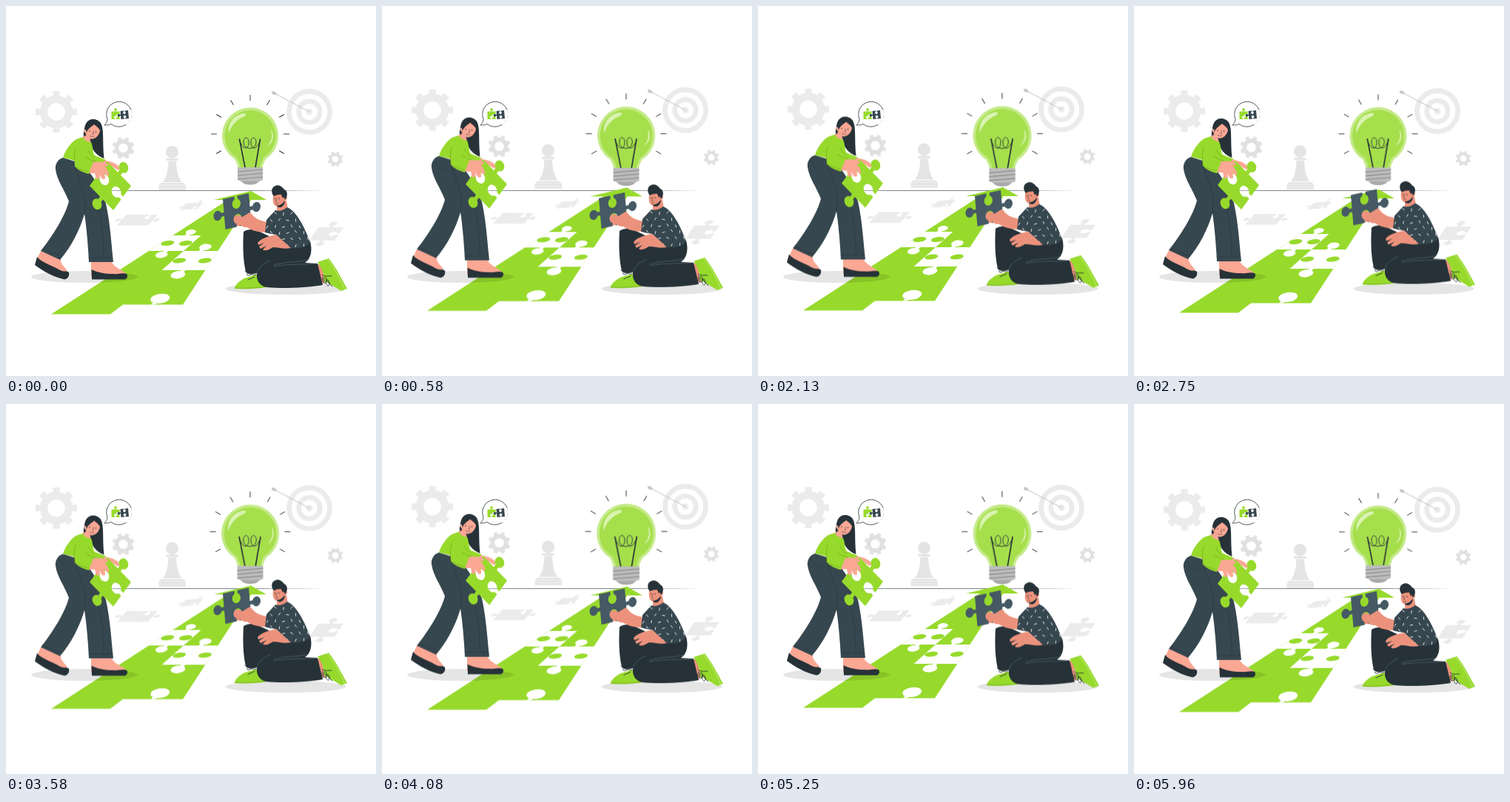
Write an HTML page that moves like this. It is 500 by 500 pixels and loops after 6000 ms.

```html
<!DOCTYPE html>
<html lang="en">
<head>
<meta charset="utf-8">
<title>Puzzle path</title>
<style>
  html, body { margin: 0; width: 100%; height: 100%; overflow: hidden; background: #fff; }
  svg { display: block; width: 100%; height: 100%; }
  .green { fill: #97da2c; }
  .dark { fill: #263238; }
  .slate { fill: #37474f; }
  .steel { fill: #455a64; }
  .pale { fill: #ebebeb; }
  .white { fill: #fff; }
  .skin { fill: #faa794; }
  .tan { fill: #ec927c; }
  .shade { fill: rgba(0, 0, 0, .1); }
  .ink, .fold, .fine, .seam { fill: none; stroke: #263238; stroke-linecap: round; stroke-linejoin: round; }
  .ink { stroke-width: .9; }
  .fold, .seam { stroke-width: .5; }
  .fine { stroke-width: .6; stroke: #6f9f1d; }
  .seam { stroke: #6b7a82; }
  .gear { fill: none; }
  #bulb { transform-origin: 330px 187px; }
</style>
</head>
<body>
<svg viewBox="0 0 500 500" xmlns="http://www.w3.org/2000/svg">
  <defs>
    <path id="shirt" d="M364 276C369 278 375 276 380 272C390 276 401 292 411 319C407 326 396 328 384 327L365 309L358 308L350 306L352 289Z"/>
    <clipPath id="shirtClip"><use href="#shirt"/></clipPath>
  </defs>

  <g id="back">
    <g id="gears"></g>
    <g id="board"></g>
    <path d="M361 117L410 143" stroke="#b5b5b5" stroke-width=".8"/>
    <path d="M358.500 116L362 115L366 118.500L365 120L360.500 119.500Z" fill="#c4c4c4"/>

    <g fill="#e4e4e4">
      <circle cx="224.500" cy="197.500" r="8.500"/>
      <rect x="216" y="206" width="17" height="3" rx="1.500"/>
      <path d="M219.500 209.500H230C230.500 221 232 231 237.500 238H212C217.500 231 219 221 219.500 209.500Z"/>
      <path d="M209 239H240.500L243 243V249H206.500V243Z"/>
      <path d="M206.500 242H243M206.500 246H243M217 209.200H232" stroke="#f7f7f7" stroke-width=".8"/>
    </g>
    <g id="tiles"></g>
  </g>

  <path d="M66 249.500L180 249L330 249L432 249.500L330 250L180 250Z" fill="#7d868a"/>
  <g id="arrow"></g>

  <ellipse class="shade" cx="106" cy="366" rx="72" ry="8"/>
  <ellipse class="shade" cx="378" cy="382" rx="81.500" ry="8"/>

  <g id="bulb">
    <g id="rays" class="ink"></g>
    <path d="M313.500 219C313 214 311 211 309 207A38 38 0 1 1 351 207C349 211 347 214 346.500 219Z" fill="#c4ea88"/>
    <path d="M317 219C316.500 213 314 209 312 205A34.500 34.500 0 1 1 348 205C346 209 344 213 343.500 219Z" fill="#a6df4c"/>
    <path d="M322 145C307 147 299 159 301 172C304 163 311 153 323 149C325 146 324 145 322 145Z" fill="#d9f3b0"/>
    <path d="M358 168C361 177 358 184 353 189C361 185 363 176 359 168Z" fill="#d9f3b0"/>
    <path class="ink" style="stroke-width:1.600" d="M315.500 180L323 218M343.500 180L337 218"/>
    <path class="ink" d="M315.500 181C319 194 328 196 328 184C328 176 321 176 321 184C321 195 338 195 338 184C338 176 331 176 331 184C331 196 340 194 343.500 181"/>
    <path d="M313 218H347V235L341 237.500H319L313 235Z" fill="#bcbcbc"/>
    <path d="M318 236.500H342C340 240.500 335 241.500 330 241.500C325 241.500 320 240.500 318 236.500Z" fill="#a9a9a9"/>
    <path d="M313 224L347 221M313 229L347 226M313 234L347 231" stroke="#8d8d8d" stroke-width="1.200"/>
  </g>

  <path class="ink" style="stroke-width:.8" d="M169 140A17 17 0 1 0 137 153C137 156 135 159 133 161C136 161 139 161 142 159.500A17 17 0 0 0 162 160.500"/>
  <path d="M169 140A17 17 0 0 1 162 160.500" fill="none" stroke="#b8bdc0" stroke-width=".5" stroke-dasharray="5 2"/>
  <g id="icons"></g>

  <g id="woman">
    <path class="dark" d="M108 162C109 153 121 150 128 158C133 167 130 183 132.500 206C123 203 114 193 114 181L106 177C103 174 106 168 108 162Z"/>
    <path class="skin" d="M47 331L74 342C73 348 79 352 83 358L76 364L40 346Z"/>
    <path class="skin" d="M115 343H142C143 351 153 355 162 361L155 365H115Z"/>
    <path class="dark" d="M42 339C48 347 60 349 73 357C78 360 82 357 85 360C86 364 84 369 79 369.500C64 366 51 359 39 350Z"/>
    <path class="dark" d="M115.500 356C124 360 133 362 145 362C151 363 157 360 163 362C165 365 164 368 161 369.500H116Z"/>
    <path class="slate" d="M77 205C70 207 66 214 67 221C69 236 79 248 85 264C80 284 62 312 47 331L73 343C88 326 100 302 106 281C109 300 111 326 112 346H145C142 318 141 295 135 267C127 250 121 234 112 224L93 210Z"/>
    <path class="fold" d="M92 212C98 235 108 250 107 268L106 281M49 328L75 339M112 340H144M72 212C75 220 79 223 83 224M121 262C130 287 132 314 132 338"/>
    <path class="skin" d="M105 174L113 178L115 187L103 181Z"/>
    <path class="green" d="M104 177C106 182 111 184 115 184C118 191 117 199 120 202L135 208L133 217L119 212L112 227C104 225 98 222 93 217L93 209C88 208 83 206 77 205C80 195 87 185 95 180Z"/>
    <path class="fine" d="M94 193C92 200 92 208 93 216M108 204C112 207 116 209 121 210M111 195C114 201 117 204 120 205M94 217C100 221 106 223 112 224"/>
    <path class="skin" d="M107 163C106 169 106 176 112 179C119 182 126 176 127 168C126 161 122 158 117 157C112 157 109 159 107 163Z"/>
    <path class="dark" d="M106 170C105 157 113 152 119 153C126 154 130 161 128 171C127 166 123 163 119 160C115 164 110 165 108 174L105 177Z"/>
    <path class="skin" d="M108 167C105 166 105 172 109 173Z"/>
    <path class="ink" d="M113 168.500V169.500M121.500 169.500V170.500"/>
    <path class="fold" d="M118 169L118.500 173L116.500 173M113 175.500Q116 177.500 119 176"/>
    <path class="skin" d="M132 209C139 209 146 211 152 216C155 220 153 223 150 221L142 216L132 217Z"/>
    <g id="tileW"></g>
    <path class="skin" d="M118 211C125 210 133 210 138 214L137 217L133 216C136 220 140 225 139 229C137 231 135 228 132 224C134 229 135 233 133 234C130 235 128 231 126 227C127 231 127 235 124 234C121 234 121 229 120 226L112 226Z"/>
  </g>

  <g id="man">
    <path class="green" d="M309 382C309 377 314 373 322 368L338 363L353 380C340 382 324 383 309 382Z"/>
    <path class="fine" d="M309 381C324 382 340 381 353 379"/>
    <path class="tan" d="M418 350L426 348L431 374L424 376Z"/>
    <path class="green" d="M421 346L436 341C447 354 454 370 461 382L453 385C443 379 434 373 429 372C431 362 426 354 421 346Z"/>
    <path d="M434 342C446 355 452 371 458 383" fill="none" stroke="#cbed94" stroke-width=".8"/>
    <path class="dark" d="M321 305C327 301 336 301 345 306L385 325L411 318C414 329 413 341 404 347L421 348L428 377C404 381 373 382 352 380C342 378 338 370 339 361C333 363 326 362 324 359C320 342 320 321 321 305Z"/>
    <path class="seam" d="M339 361C340 354 347 348 357 344M362 350C378 345 392 347 409 343M362 352C380 348 400 350 420 348"/>
    <path class="tan" d="M366 266L379 263L381 275C376 280 369 280 366 277Z"/>
    <circle class="tan" cx="313.500" cy="290" r="7.500"/>
    <g id="tileM"></g>
    <path class="tan" d="M314 287C320 286 326 280 330 279C335 284 337 289 353 292L352 306C340 306 331 303 326 299C320 299 316 297 315 293Z"/>
    <use class="slate" href="#shirt"/>
    <g id="dashes" stroke="#e8edef" stroke-width=".9" stroke-linecap="round" clip-path="url(#shirtClip)"></g>
    <path class="fold" d="M364 290C361 297 362 304 366 309M394 313C391 320 388 324 384 327"/>
    <path class="tan" d="M365 309L385 327C376 329 367 326 361 326C356 329 350 332 347 329L352 324L344 328L342 325L349 320L341 323L340 320C346 313 356 311 365 309Z"/>
    <path class="tan" d="M362 253C360 260 360 267 364 270C369 273 376 270 377 263C381 262 381 257 377 256L374 250Z"/>
    <path class="dark" d="M362 257C358 253 358 245 364 243C369 241 373 244 376 248C381 250 381 257 377 262C376 259 375 257 374 260L372 255C369 254 364 256 362 257Z"/>
    <path class="dark" d="M366 269.500C370 270 374 267 377 263C377 268 373 273 369 272C367 271.500 366 270.500 366 269.500Z"/>
    <path class="ink" d="M363.500 260V260.800M369 260V260.800"/>
    <path class="fold" d="M366 260L364.500 264L366 264.500M364.500 267H367.500"/>
    <path class="ink" d="M323 358C328 362 334 364 338 363M325 361C329 357 336 359 331 363C326 366 323 362 329 361M327 370L336 366"/>
    <path class="ink" d="M427 363C432 367 437 364 440 365M428 366C425 372 431 378 433 372C434 365 427 365 430 372M433 369C430 376 437 382 437 375C437 368 431 369 436 374L441 379"/>
  </g>
</svg>
<script>
const $ = id => document.getElementById(id);
const add = (id, markup) => $(id).insertAdjacentHTML('beforeend', markup);

// Jigsaw tile; tabs lists top, right, bottom, left: 1 tab, -1 notch, 0 flat.
function tile(id, cls, [x, y], [ux, uy], [vx, vy], tabs) {
  const turn = (px, py, k) => {
    for (; k > 0; k--) [px, py] = [1 - py, px];
    return px.toFixed(3) + ' ' + py.toFixed(3);
  };
  let d = 'M0 0';
  tabs.forEach((t, k) => {
    if (t) {
      const p = (px, py) => turn(px, py * -t, k);
      d += `L${p(.44, 0)}L${p(.44, .1)}A.16 .16 0 1 ${t > 0 ? 1 : 0} ${p(.56, .1)}L${p(.56, 0)}`;
    }
    d += 'L' + turn(1, 0, k);
  });
  add(id, `<path class="${cls}" transform="matrix(${ux} ${uy} ${vx} ${vy} ${x} ${y})" d="${d}Z"/>`);
}

tile('tiles', 'pale', [163, 282], [21, 0], [-13, 14.5], [0, -1, 0, 1]);
tile('tiles', 'pale', [184, 282], [21, 0], [-13, 14.5], [-1, 1, 0, 1]);
tile('tiles', 'pale', [243, 267], [12, -1], [-8, 9], [0, 1, 0, 1]);
tile('tiles', 'pale', [255, 266], [12, -1], [-8, 9], [1, 0, -1, 0]);
tile('tiles', 'pale', [422, 299], [34, 0], [-12, 18], [1, -1, 1, 0]);
tile('icons', 'green', [142.5, 142.5], [11, 0], [0, 10.5], [1, -1, -1, 0]);
tile('icons', 'slate', [154.5, 142], [10.5, -1], [1, 11], [-1, 0, -1, 1]);
tile('tileW', 'green', [137, 210], [32, 33], [-24, 33], [1, -1, 1, -1]);
tile('tileM', 'steel', [293, 261], [35, -8], [3.5, 41], [-1, 1, -1, 1]);

function gear(x, y, r, turn, color) {
  const ring = (a, b, extra = '') =>
    `<circle r="${r * (a + b) / 2}" stroke-width="${r * (b - a)}" ${extra}/>`;
  add('gears', `<g class="gear" stroke="${color}" transform="translate(${x} ${y}) rotate(${turn})">` +
    ring(.42, .8) + ring(.78, 1, 'pathLength="16" stroke-dasharray=".95 1.05" stroke-dashoffset=".475"') + '</g>');
}
gear(68, 143, 28, 0, '#ebebeb');
gear(158.5, 192, 15, 22.5, '#e0e0e0');
gear(445, 207, 10.5, 22.5, '#e0e0e0');

for (let k = 0; k < 5; k++)
  add('board', `<circle class="${k % 2 ? 'white' : 'pale'}" cx="410" cy="143" r="${31 - k * 6.7}"/>`);

for (let a = 150; a <= 390; a += 30)
  add('rays', `<path d="M45.500 0H52.500" transform="translate(330 173) rotate(${a})"/>`);

// The path narrows to its tip: three straight lines give x at any height.
const left = y => 61 + (416.5 - y) * 1.545;
const mid = y => 158 + (403.5 - y) * 1.13;
const right = y => 239 + (403.5 - y) * .653;

function knob(cls, x, y, dx, dy, rx, ry) {
  add('arrow', `<g class="${cls}"><path d="M${x - 3} ${y}h6l${dx} ${dy}h-6Z"/>` +
    `<ellipse transform="translate(${x + dx} ${y + dy}) rotate(-8)" rx="${rx}" ry="${ry}"/></g>`);
}

// A socket above (up = 1) or below (up = -1) the edge at height y.
function socket(a, b, y, up) {
  const d = 4 + (y - 300) * .04;
  knob('white', (a(y) + b(y)) / 2, y, 1.2 * d * up, -d * up, 1.6 * d, .8 * d);
}

function gap(a, b, y0, y1) {
  const y = (y0 + y1) / 2;
  add('arrow', `<path class="white" d="M${a(y0)} ${y0}H${b(y0)}L${b(y1)} ${y1}H${a(y1)}Z"/>`);
  socket(a, b, y0, 1);
  socket(a, b, y1, -1);
  knob('green', a(y), y, 9, 0, 9, 3.4);
  knob('green', b(y), y, -9, 0, 9, 3.4);
}

add('arrow', `<path class="green" d="M61 416.500L${left(262)} 262H281L331 250L352 262H${right(262)}L239 403.500H158L141 416.500Z"/>`);
gap(left, mid, 310, 331);
gap(mid, right, 331, 357);
socket(mid, right, 403.5, 1);

// Shirt pattern: a staggered grid of short strokes turned by seeded chance.
let seed = 7;
const rand = () => (seed = seed * 16807 % 2147483647) / 2147483647;
for (let row = 0; row < 6; row++)
  for (let col = 0; col < 6; col++) {
    const x = 353 + col * 11 + row % 2 * 5.5, y = 279 + row * 8.5 + rand() * 3;
    add('dashes', `<path d="M-1.700 0H1.700" transform="translate(${x} ${y}) rotate(${rand() * 180})"/>`);
  }

// Each part moves at constant speed to its far pose and back.
const sway = (id, half, from, to) => {
  $(id).animate({ transform: [from, to] },
    { duration: half, iterations: Infinity, direction: 'alternate' }).startTime = 0;
};
const lift = (id, half) => sway(id, half, 'translateY(0px)', 'translateY(-6px)');

lift('back', 1500);
lift('woman', 1500);
lift('arrow', 750);
lift('man', 3000);
sway('bulb', 1500, 'scale(1)', 'scale(1.07)');
</script>
</body>
</html>
```
